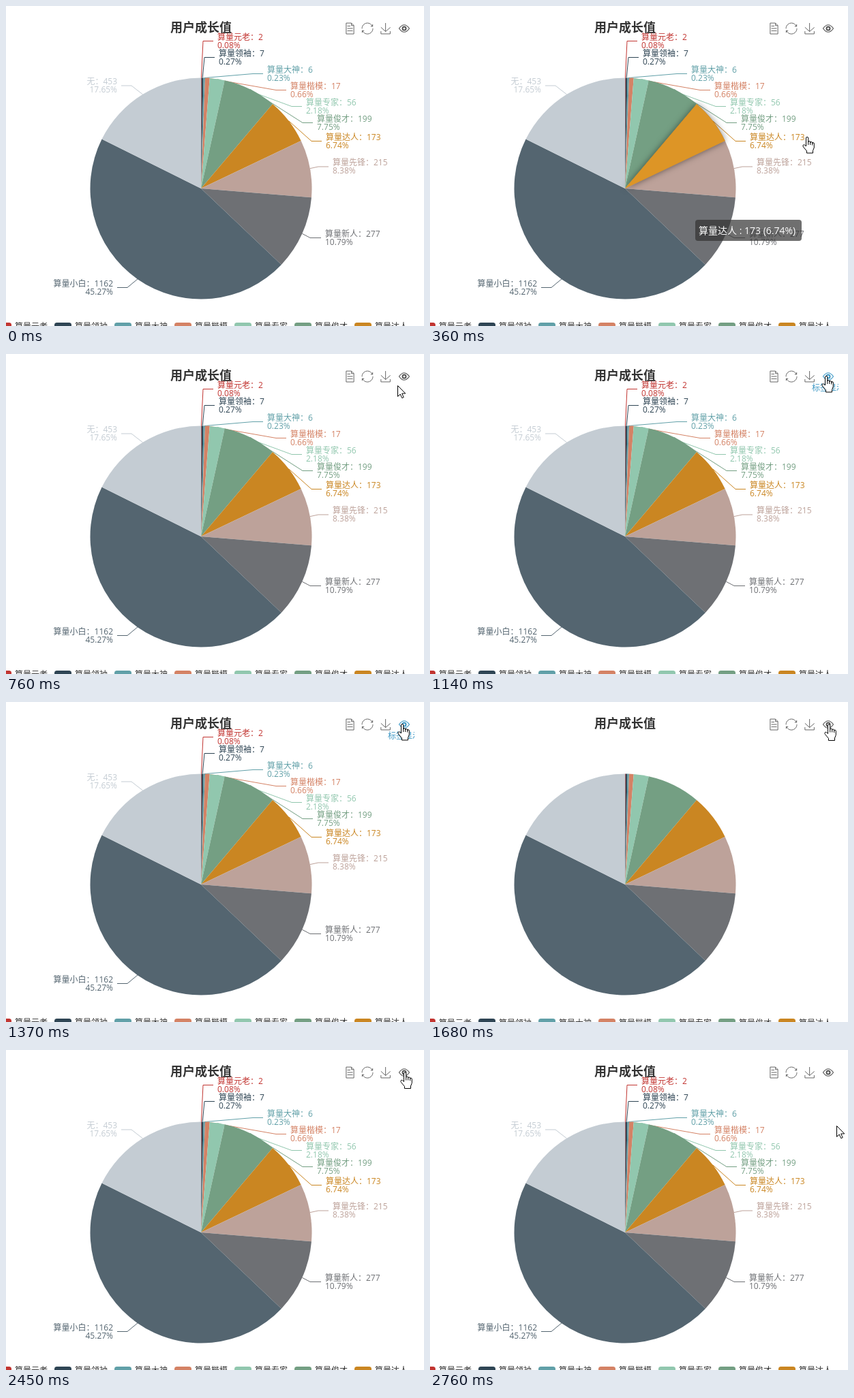
Animation, 613 px wide and 470 px high, one loop 2.84 s. Source, as an HTML page:

```html
<!DOCTYPE html>
<html lang="zh-CN">
<head>
<meta charset="utf-8">
<title>用户成长值</title>
<style>
  html, body { margin: 0; width: 100%; height: 100%; overflow: hidden; background: #fff; }
  svg { display: block; }
  text { font: 12px "Open Sans", "Noto Sans CJK SC", "Noto Sans CJK", sans-serif; white-space: pre; }
  #title { font-size: 18px; font-weight: 700; fill: #333; text-anchor: middle; }
  #legend text { fill: #333; }
  #tools, #eye { fill: none; stroke: #666; }
  #tools path { vector-effect: non-scaling-stroke; }
  #eye { stroke: #555; stroke-width: 1.2; }
  #eye circle { stroke-width: 2; }
  #eye.hover { stroke: #3e98c5; }
  #hint { fill: #3e98c5; text-anchor: middle; }
  #tip text { font-size: 14px; font-weight: 500; fill: #fff; }
  .active { filter: drop-shadow(0 0 5px rgba(0, 0, 0, .5)); }
  .pointer { fill: #fff; stroke: #000; stroke-linejoin: round; }
</style>
</head>
<body>
<svg width="613" height="470">
  <svg width="599" height="470">
    <g id="leaders" fill="none"></g>
    <g id="slices"></g>
    <g id="labels"></g>
    <text id="title" x="286" y="37.5">用户成长值</text>
    <g id="legend"></g>
    <g id="tools">
      <path transform="translate(495.6 24.5) scale(.285)" d="M17.5 17.3H33M45.4 29.5h-28M45.4 41.7h-28M11.5 2v56H51V14.8L38.4 2zM38.4 2.2v12.7H51"/>
      <path transform="translate(521.5 24.5) scale(.285)" d="M47 18.9h9.8V8.7M56.3 20.1C52.1 9 40.5.6 26.8 2.1 12.6 3.7 1.6 16.2 2.1 30.6M13 41.1H3.1v10.2M3.7 39.9c4.2 11.1 15.8 19.5 29.5 18 14.2-1.6 25.2-14.1 24.7-28.5"/>
      <path transform="translate(548.6 25) scale(.275)" d="M4.7 22.9l24.6 22.6 25.4-22.1M4.6 43.6V58h49.2V43.6M29.2 45.1V0"/>
    </g>
    <g id="eye">
      <path d="M576.5 33Q584 22.5 591.5 33 584 43.5 576.5 33z"/>
      <circle cx="584" cy="33" r="2.5"/>
    </g>
    <text id="hint" x="584" y="53.5">标签显示</text>
  </svg>
  <g id="tip">
    <rect width="156" height="31" rx="4" fill="#323232" fill-opacity=".7"/>
    <text x="5" y="21">算量达人 : 173 (6.74%)</text>
  </g>
  <circle id="click" r="12.3" fill="#ff0" fill-opacity=".53"/>
  <path id="arrow" class="pointer" d="M.5.5V16.4L4.2 13 6.8 18.7 9.2 17.6 6.7 12H11.8z"/>
  <path id="hand" class="pointer" d="M-1.500 14V2a1.6 1.6 0 0 1 3.2 0V8a1.5 1.5 0 0 1 3 0V9a1.5 1.5 0 0 1 3 0v1a1.3 1.3 0 0 1 2.6 0v6l-1.8 4.5V24H-.5v-3l-5-6c-1-1.6-.6-3 .6-3.2 1.2-.1 2.2.7 3.4 2.2zM1.700 8v4M4.700 9v3M7.700 10v2.500"/>
</svg>
<script>
const LOOP = 2840;
const CX = 286, CY = 268, R = 162.5;
const ACTIVE = 6;

// name, value, colour, text x, centre y, bend x of the leader line
const data = [
  ['算量元老', 2, '#c23531', 310, 51, 289],
  ['算量领袖', 7, '#2f4554', 312, 75, 291],
  ['算量大神', 6, '#61a0a8', 383, 99, 362],
  ['算量楷模', 17, '#d48265', 417, 123, 396],
  ['算量专家', 56, '#91c7ae', 440, 147, 419],
  ['算量俊才', 199, '#749f83', 456, 171, 435],
  ['算量达人', 173, '#ca8622', 469, 198, 448],
  ['算量先锋', 215, '#bda29a', 479, 235.5, 458],
  ['算量新人', 277, '#6e7074', 468, 340, 446],
  ['算量小白', 1162, '#546570', 157, 413, 178],
  ['无', 453, '#c4ccd3', 163, 116.5, 184]
];
const total = data.reduce((sum, row) => sum + row[1], 0);

const $ = id => document.getElementById(id);

function add(parent, tag, attrs, text = '') {
  const node = document.createElementNS('http://www.w3.org/2000/svg', tag);
  for (const key in attrs) node.setAttribute(key, attrs[key]);
  node.textContent = text;
  return parent.appendChild(node);
}

function rim(value) {
  const angle = value / total * 2 * Math.PI;
  return [CX + R * Math.sin(angle), CY - R * Math.cos(angle)];
}

function slicePath(from, value) {
  const large = value > total / 2 ? 1 : 0;
  return `M${CX} ${CY}L${rim(from)}A${R} ${R} 0 ${large} 1 ${rim(from + value)}z`;
}

let sum = 0, activePath;
data.forEach(([name, value, color, x, y, bend], i) => {
  const d = slicePath(sum, value);
  if (i === ACTIVE) activePath = d;
  add($('slices'), 'path', { d, fill: color });

  const left = x < CX;
  const end = left ? x + 6 : x - 6;
  add($('leaders'), 'polyline', {
    points: `${rim(sum + value / 2)} ${bend},${y + .5} ${end},${y + .5}`, stroke: color
  });
  const style = { x, fill: color, 'text-anchor': left ? 'end' : 'start' };
  add($('labels'), 'text', { ...style, y: y - 1.5 }, `${name}：${value}`);
  add($('labels'), 'text', { ...style, y: y + 10.5 }, (value / total * 100).toFixed(2) + '%');

  if (i <= ACTIVE) {
    const lx = 88 * i - 17;
    add($('legend'), 'rect', { x: lx, y: 465, width: 25, height: 14, rx: 3.5, fill: color });
    add($('legend'), 'text', { x: lx + 30, y: 474.5 }, name);
  }
  sum += value;
});
const active = add($('slices'), 'path', { d: activePath, fill: '#dd9526', class: 'active' });

// start time, pointer kind, hot spot, extra state
const scenes = [
  [0, '', 0, 0],
  [140, 'arrow', 576, 372],
  [210, 'arrow', 572, 316],
  [290, 'arrow', 563, 252],
  [360, 'hand', 553, 192, { active: true, tip: [389, 314] }],
  [450, 'arrow', 545, 131, { tip: [373, 247] }],
  [530, 'arrow', 550, 102],
  [610, 'arrow', 559, 77],
  [680, 'arrow', 568, 58],
  [760, 'arrow', 574, 46],
  [840, 'hand', 579, 37, { hover: true }],
  [910, 'hand', 582, 33, { hover: true }],
  [1140, 'hand', 581, 32, { hover: true }],
  [1220, 'hand', 581, 32, { hover: true, click: true }],
  [1370, 'hand', 581, 32, { hover: true }],
  [1450, 'hand', 581, 32, { bare: true }],
  [1680, 'hand', 585, 32.5, { bare: true }],
  [2220, 'hand', 585, 32.5, { bare: true, click: true }],
  [2370, 'hand', 585, 32.5, { bare: true }],
  [2450, 'hand', 585, 32.5],
  [2680, 'arrow', 592, 72],
  [2760, 'arrow', 596, 111]
];

function show(node, on) {
  node.style.display = on ? '' : 'none';
}

function place(node, x, y) {
  node.setAttribute('transform', `translate(${x} ${y})`);
}

let current;
function render(time) {
  const t = time % LOOP;
  const scene = scenes.findLast(s => s[0] <= t);
  if (scene === current) return;
  current = scene;

  const [, kind, x, y, state = {}] = scene;
  for (const id of ['arrow', 'hand']) {
    show($(id), id === kind);
    place($(id), x, y);
  }
  show($('click'), state.click);
  place($('click'), x - 2, y + .5);
  show($('tip'), state.tip);
  if (state.tip) place($('tip'), ...state.tip);
  show(active, state.active);
  show($('labels'), !state.bare);
  show($('leaders'), !state.bare);
  show($('hint'), state.hover);
  $('eye').classList.toggle('hover', !!state.hover);
  for (const text of $('legend').querySelectorAll('text')) {
    text.setAttribute('y', state.bare ? 475.5 : 474.5);
  }
}

const start = performance.now();
function tick() {
  render(performance.now() - start);
  requestAnimationFrame(tick);
}
tick();
</script>
</body>
</html>
```
